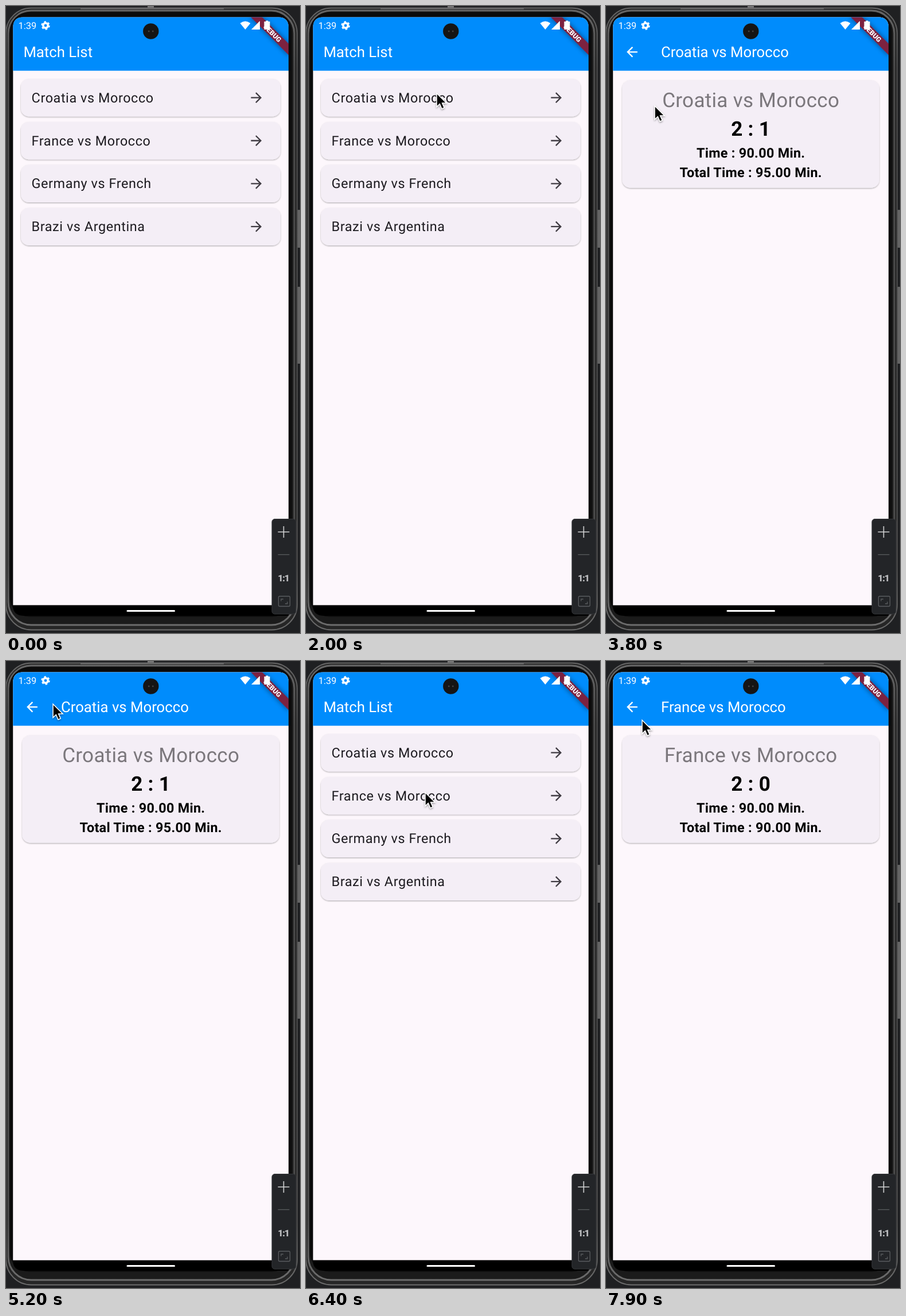
Animation of 513x1092 px, one loop 8000 ms. Source, as an HTML page:

```html
<!DOCTYPE html>
<html lang="en">
<head>
<meta charset="utf-8">
<style>
  html, body { margin: 0; width: 100%; height: 100%; overflow: hidden; background: #1f2022; }
  svg { display: block; width: 513px; height: 1092px; font-family: Roboto, sans-serif; text-rendering: geometricPrecision; }
  .title { font-size: 25.72px; fill: #fff; }
  .row { font-size: 23.38px; letter-spacing: .585px; fill: #1c1a1f; }
  .detail { text-anchor: middle; letter-spacing: .29px; font-weight: 700; font-size: 23.38px; }
  .big { font-size: 35.07px; }
  .grey { font-weight: 400; fill: #7b777c; }
</style>
</head>
<body>
<svg viewBox="0 0 513 1092">
  <defs>
    <clipPath id="screen"><path d="M12.300 1043.600V37Q12.300 19.400 30 19.400H475Q493 19.400 493 37V1043.600Z"/></clipPath>
    <linearGradient id="metal" x2="0" y2="1">
      <stop stop-color="#666"/><stop offset=".1" stop-color="#4a4a4a"/>
      <stop offset=".9" stop-color="#4c4c4c"/><stop offset="1" stop-color="#6c6c6c"/>
    </linearGradient>
    <filter id="cardShadow" x="-5%" y="-10%" width="110%" height="125%">
      <feDropShadow dx="0" dy="1.2" stdDeviation=".8" flood-opacity=".3"/>
    </filter>
    <filter id="soft" x="-50%" y="-50%" width="200%" height="200%">
      <feDropShadow dx="0" dy="1.5" stdDeviation="1.5" flood-opacity=".4"/>
    </filter>
    <filter id="ribbonShadow" x="-30%" y="-150%" width="160%" height="400%">
      <feDropShadow dx="0" dy="0" stdDeviation="4.6" flood-opacity=".5"/>
    </filter>
    <path id="next" d="M12 4l-1.41 1.41L16.17 11H4v2h12.17l-5.58 5.59L12 20l8-8z" transform="scale(1.169) translate(-12 -12)"/>
    <g id="page">
      <rect x="12" y="19" width="481" height="1025" fill="#fdf7fc"/>
      <rect x="12" y="19" width="481" height="93.700" fill="#008cfc"/>
    </g>
  </defs>

  <!-- Phone body -->
  <rect x="247" width="11" height="5" fill="#777"/>
  <rect x="508" y="355" width="6" height="66" rx="2" fill="#646464"/>
  <rect x="508" y="489" width="6" height="134" rx="2" fill="#646464"/>
  <rect x="0" y="3.500" width="508" height="1083" rx="44" fill="#262626" stroke="url(#metal)" stroke-width="2"/>
  <rect x="4" y="8" width="499" height="1070" rx="40" fill="#1b1b1b" stroke="url(#metal)" stroke-width="3"/>
  <path d="M130 4.500H380" stroke="#707070" stroke-width="2"/>
  <rect x="6.500" y="10.500" width="492" height="1053" rx="34" fill="#0b0b0b"/>
  <path d="M12 1040H493V1062H32Q12 1062 12 1044Z"/>

  <g clip-path="url(#screen)">
    <g id="list">
      <use href="#page"/>
      <text class="title" x="30.400" y="88.900">Match List</text>
      <g id="rows"></g>
    </g>
    <rect id="scrim" x="12" y="19" width="481" height="1025"/>
    <g id="detail">
      <use href="#page"/>
      <use href="#next" transform="translate(45.500 80.100) scale(-1 1)" fill="#fff"/>
      <text class="title name" x="96" y="88.900"></text>
      <rect x="28.300" y="129.200" width="448.500" height="187.500" rx="14" fill="#f4eef6" filter="url(#cardShadow)"/>
      <text class="detail big grey name" x="252.700" y="175.900"></text>
      <text class="detail big" id="score" x="252.700" y="226.300"></text>
      <text class="detail" x="252.700" y="264">Time : 90.00 Min.</text>
      <text class="detail" id="total" x="252.700" y="297.900"></text>
    </g>
    <!-- Debug ribbon -->
    <g transform="translate(465 47.400) rotate(45)">
      <rect x="-46.800" y="-7" width="93.600" height="14" fill="#7b2341" filter="url(#ribbonShadow)"/>
      <text y="4.100" text-anchor="middle" font-size="11.900" font-weight="900" fill="#fff">DEBUG</text>
    </g>
  </g>

  <!-- Status bar -->
  <g fill="#fff">
    <text x="21.500" y="39.700" font-size="16.400">1:39</text>
    <circle cx="69" cy="34" r="4.200" fill="none" stroke="#fff" stroke-width="3.600"/>
    <circle cx="69" cy="34" r="6.500" fill="none" stroke="#fff" stroke-width="2.400" stroke-dasharray="3.400 3.407"/>
    <path d="M408.500 30Q417.500 23 426.500 30L417.500 41Z"/>
    <path d="M428 41L443 26V41Z"/>
    <path d="M450.500 27H453.500V25.500H457.500V27H460.500V41H450.500Z"/>
  </g>
  <circle cx="252.800" cy="44" r="13.700" fill="#151515"/>
  <path d="M248 44h2.500M255 44h2.500" stroke="#444" stroke-width="2.500"/>
  <rect x="210.500" y="1052" width="84.500" height="3" rx="1.500" fill="#fff"/>

  <!-- Emulator zoom panel -->
  <rect x="464" y="893.500" width="42" height="165.500" rx="5" fill="#232528" stroke="#35373a"/>
  <g fill="none" stroke="#5a5c5f" stroke-width="1.300">
    <path d="M474.500 916H494.500M484.500 906V926" stroke="#d2d3d4" stroke-width="1.600"/>
    <path d="M474.500 955.500H494.500"/>
    <rect x="475.500" y="1028" width="20" height="17.500" rx="2"/>
    <path d="M480 1036.500V1033H484M487 1041H491V1037.500"/>
  </g>
  <text x="484" y="1002" text-anchor="middle" font-size="16" font-weight="800" letter-spacing="-1.300" fill="#bfc0c2">1:1</text>

  <path id="cursor" d="M0 0V23.500L5.300 18.500L9 27L13.200 25.200L9.600 17H17Z" stroke="#fff" stroke-width="1.500" filter="url(#soft)"/>
</svg>

<script>
const $ = id => document.getElementById(id);
const LOOP = 8000, STEP = 100, TRANSITION = 300;
const MATCHES = [
  { name: "Croatia vs Morocco", score: "2 : 1", total: "95.00" },
  { name: "France vs Morocco", score: "2 : 0", total: "90.00" },
  { name: "Germany vs French" },
  { name: "Brazi vs Argentina" }
];
const PUSH_FIRST = 2830, POP = 5700, PUSH_SECOND = 6627;
// Pointer path: time, x, y
const POINTER = [
  [900, 300, 1092], [1900, 228, 152], [2900, 228, 152], [3700, 85, 174], [4600, 85, 174],
  [5200, 82, 75], [5500, 67, 87], [5800, 67, 87], [6400, 208, 229], [7200, 208, 229], [7900, 63, 103]
];

$("rows").innerHTML = MATCHES.map(({ name }, i) => `
  <g transform="translate(0 ${126.9 + i * 74.83})">
    <rect x="26" width="453" height="65.500" rx="14" fill="#f4eef6" filter="url(#cardShadow)"/>
    <rect class="ink" x="26" width="453" height="65.500" opacity="0" fill-opacity=".075"/>
    <text class="row" x="44.600" y="40.800">${name}</text>
    <use href="#next" transform="translate(436.800 32.800)" fill="#413d44"/>
  </g>`).join("");
const inks = document.querySelectorAll(".ink");

const ramp = (t, from, to) => Math.min(1, Math.max(0, (t - from) / (to - from)));
const mix = (a, b, k) => a + (b - a) * k;

function cubic(x1, y1, x2, y2, x) {
  const at = (a, b, s) => 3 * a * s * (1 - s) ** 2 + 3 * b * s * s * (1 - s) + s ** 3;
  let low = 0, high = 1;
  for (let i = 0; i < 24; i++) {
    const mid = (low + high) / 2;
    if (at(x1, x2, mid) < x) low = mid; else high = mid;
  }
  return at(y1, y2, low);
}

// Two-part curve of the Material zoom page transition
function zoomCurve(p) {
  const split = 1 / 6;
  return p < split
    ? .4 * cubic(.05, 0, .1333, .06, p / split)
    : .4 + .6 * cubic(.2083, .82, .25, 1, (p - split) / (1 - split));
}

function setPage(id, scale, opacity) {
  $(id).setAttribute("transform", `translate(252.6 531.5) scale(${scale}) translate(-252.6 -531.5)`);
  $(id).setAttribute("opacity", opacity);
}

function showMatch({ name, score, total }) {
  document.querySelectorAll(".name").forEach(el => el.textContent = name);
  $("score").textContent = score;
  $("total").textContent = `Total Time : ${total} Min.`;
}

function drawPages(t) {
  const popping = t >= POP && t < PUSH_SECOND;
  const start = popping ? POP : t < POP ? PUSH_FIRST : PUSH_SECOND;
  const p = ramp(t, start, start + TRANSITION), k = zoomCurve(p);
  showMatch(MATCHES[t < PUSH_SECOND ? 0 : 1]);
  if (popping) {
    setPage("list", mix(1.1, 1, k), 1);
    setPage("detail", mix(1, .9, k), 1 - ramp(p, .0825, .2075));
  } else {
    setPage("list", mix(1, 1.05, k), 1);
    setPage("detail", mix(.85, 1, k), ramp(p, .125, .25));
  }
  $("scrim").setAttribute("opacity", popping ? 0 : .6 * ramp(p, .2075, .4175));
  inks[0].setAttribute("opacity", ramp(t, 2700, 2850) * (1 - ramp(t, 5820, 6050)));
  inks[1].setAttribute("opacity", ramp(t, 6400, 6600));
}

function drawPointer(t) {
  const next = POINTER.findIndex(point => point[0] > t);
  const b = POINTER.at(next), a = next > 0 ? POINTER[next - 1] : b;
  const p = a === b ? 0 : ramp(t, a[0], b[0]), k = p * p * (3 - 2 * p);
  $("cursor").setAttribute("visibility", t < POINTER[0][0] ? "hidden" : "visible");
  $("cursor").setAttribute("transform", `translate(${mix(a[1], b[1], k)} ${mix(a[2], b[2], k)})`);
}

const begin = performance.now();
function frame(now) {
  const t = Math.floor(Math.max(0, now - begin) % LOOP / STEP) * STEP;
  drawPages(t);
  drawPointer(t);
  requestAnimationFrame(frame);
}
frame(begin);
</script>
</body>
</html>
```
